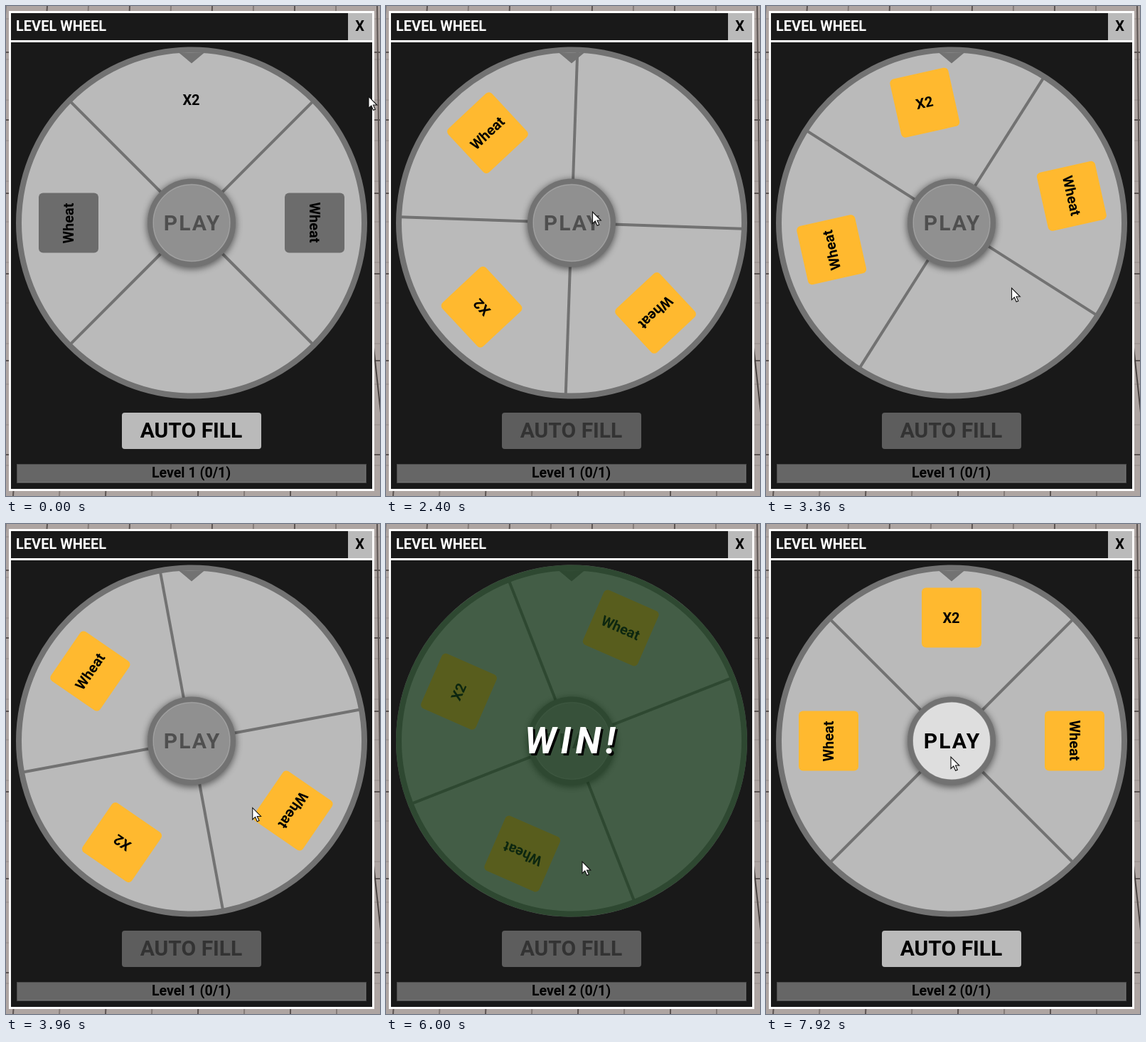
An HTML page for the animation above (8 s loop, 526 by 688 pixels).

```html
<!DOCTYPE html>
<html lang="en">
<head>
<meta charset="utf-8">
<title>Level wheel</title>
<style>
  html, body { margin: 0; width: 100%; height: 100%; overflow: hidden; background: #aea5a2; }
  svg { display: block; width: 526px; height: 688px; }
  text { font: bold 20px Roboto, Arial, sans-serif; text-anchor: middle; }
  .big { font-size: 30px; }
</style>
</head>
<body>
<svg viewBox="0 0 526 688">
  <defs>
    <filter id="soft" x="-30%" y="-30%" width="160%" height="160%"><feGaussianBlur stdDeviation="5"/></filter>
  </defs>

  <rect width="526" height="688" fill="#aea5a2"/>
  <g id="floor" fill="none"/>

  <rect x="5.5" y="8.5" width="511" height="671" fill="#191919" stroke="#fff" stroke-width="3"/>
  <rect x="481" y="10" width="34" height="38" fill="#bababa"/>
  <rect x="5" y="48" width="512" height="3" fill="#fff"/>
  <text x="14" y="35" fill="#fff" style="text-anchor:start">LEVEL WHEEL</text>
  <text x="497.5" y="35">X</text>

  <g transform="translate(261 304.5)">
    <circle r="243" fill="#bababa" stroke="#727272" stroke-width="8"/>
    <g id="wheel"></g>
    <path d="M-18-239H18L0-224Z" fill="#727272"/>
    <circle r="63" cy="2" fill="#000" opacity=".5" filter="url(#soft)"/>
    <circle r="58" fill="#909090" stroke="#727272" stroke-width="8" id="hub"/>
    <circle r="54" fill="none" stroke="#fff" stroke-opacity=".22" stroke-width="1.5"/>
    <text id="play" class="big" x="1" y="10.5" letter-spacing="2">PLAY</text>
    <g id="win">
      <circle r="247" fill="#123716" fill-opacity=".7"/>
      <g style="font-style:italic">
        <text class="winText" x="-63" y="20.5" fill="#000">WIN!</text>
        <text class="winText" x="-66" y="17.5" fill="#fff">WIN!</text>
      </g>
    </g>
  </g>

  <rect id="button" x="163" y="571" width="196" height="51" rx="4"/>
  <text id="buttonText" class="big" x="260.5" y="606">AUTO FILL</text>

  <rect x="15.5" y="643.5" width="491" height="26" fill="#666" stroke="#4c4c4c"/>
  <path d="M17 668.5H505.500V645" fill="none" stroke="#747474"/>
  <text id="level" x="260.5" y="662" style="font-size:19.6px"></text>

  <path id="cursor" d="M0 0V16.500L3.800 13L6.600 19.300L9.300 18.100L6.500 12H11.800Z" fill="#fff" stroke="#111" stroke-width="1.100"/>
</svg>
<style>.winText { font-size: 52px; font-style: italic; letter-spacing: 6.3px; text-anchor: start; }</style>

<script>
const LOOP = 8000, STEP = 120;
const FILL = 840, SPIN = 1780, STOP = 4882, WIN = 4760, RESET = 6800, REFILL = 7560;
const TURN = 2093.6;
const $ = id => document.getElementById(id);
const clamp = v => Math.max(0, Math.min(1, v));

// Floor tiles showing around the window
const line = (d, color, width) => `<path d="${d}" stroke="${color}" stroke-width="${width}"/>`;
let floor = "";
for (const y of [65, 160, 263, 376, 498, 630]) floor += line(`M0 ${y}H526`, "#5c5452", 2);
for (let i = 0; i < 12; i++) floor += line(`M0 ${18 + i * 57}H526`, "#958c89", 1);
for (let i = 0; i < 10; i++) floor += line(`M${i * 58} 0L${i * 65 - 55} 688`, i % 2 ? "#5c5452" : "#857c79", 2);
floor += line("M516 470L528 580", "#4a4341", 2);
$("floor").innerHTML = floor;

// Wheel spokes and prize slots
let parts = "";
for (let a = 45; a < 360; a += 90) parts += `<path d="M0-58V-240" stroke="#727272" stroke-width="4" transform="rotate(${a})"/>`;
for (const [angle, label] of [[-90, "Wheat"], [0, "X2"], [90, "Wheat"]]) {
  parts += `<g transform="rotate(${angle}) translate(0 -173)">
    <rect class="slot" x="-42" y="-42" width="84" height="84" rx="6"/>
    <text x="-.5" y="7">${label}</text></g>`;
}
$("wheel").innerHTML = parts;
const slots = [...document.querySelectorAll(".slot")];

// Pointer stops: time, x, y
const route = [
  [0, 510, 127], [600, 255, 598], [860, 255, 598], [1520, 290.500, 289], [2420, 290.500, 289],
  [3300, 345.500, 396], [4440, 347.500, 400], [5100, 342, 408], [6000, 276, 474],
  [6700, 255, 592], [7540, 255, 594], [7920, 260, 327]
];

function pointerAt(t) {
  const i = route.findIndex(stop => stop[0] > t);
  if (i < 0) return route.at(-1).slice(1);
  const [t0, x0, y0] = route[i - 1], [t1, x1, y1] = route[i];
  const u = (t - t0) / (t1 - t0), k = u * u * (3 - 2 * u);
  return [x0 + (x1 - x0) * k, y0 + (y1 - y0) * k];
}

function wheelAngle(t) {
  if (t < SPIN || t >= RESET) return 0;
  return TURN * (1 - (1 - clamp((t - SPIN) / (STOP - SPIN))) ** 2.7);
}

function draw(t) {
  const [x, y] = pointerAt(t);
  const busy = t >= SPIN && t < RESET;
  const filled = t >= FILL && t < RESET || t >= REFILL;
  const ready = filled && !busy;
  const overHub = Math.hypot(x - 261, y - 304.5) < 62;
  const overButton = x > 163 && x < 359 && y > 571 && y < 622;

  $("cursor").setAttribute("transform", `translate(${x} ${y})`);
  $("wheel").setAttribute("transform", `rotate(${wheelAngle(t)})`);
  slots.forEach((slot, i) => slot.setAttribute("fill", filled ? "#ffb92f" : i === 1 ? "none" : "#6c6c6c"));
  $("hub").setAttribute("fill", !ready ? "#909090" : overHub ? "#dedede" : "#bababa");
  $("play").setAttribute("fill", ready ? "#000" : "#4f4f4f");
  $("button").setAttribute("fill", busy ? "#5d5d5d" : overButton ? "#dedede" : "#bababa");
  $("buttonText").setAttribute("fill", busy ? "#333" : "#000");
  $("level").textContent = `Level ${t < WIN ? 1 : 2} (0/1)`;
  $("win").setAttribute("opacity", t < RESET ? clamp((t - WIN) / 150) : 0);
}

const start = performance.now();
function tick() {
  const t = (performance.now() - start) % LOOP;
  draw(Math.floor(t / STEP) * STEP);
  requestAnimationFrame(tick);
}
tick();
</script>
</body>
</html>
```
